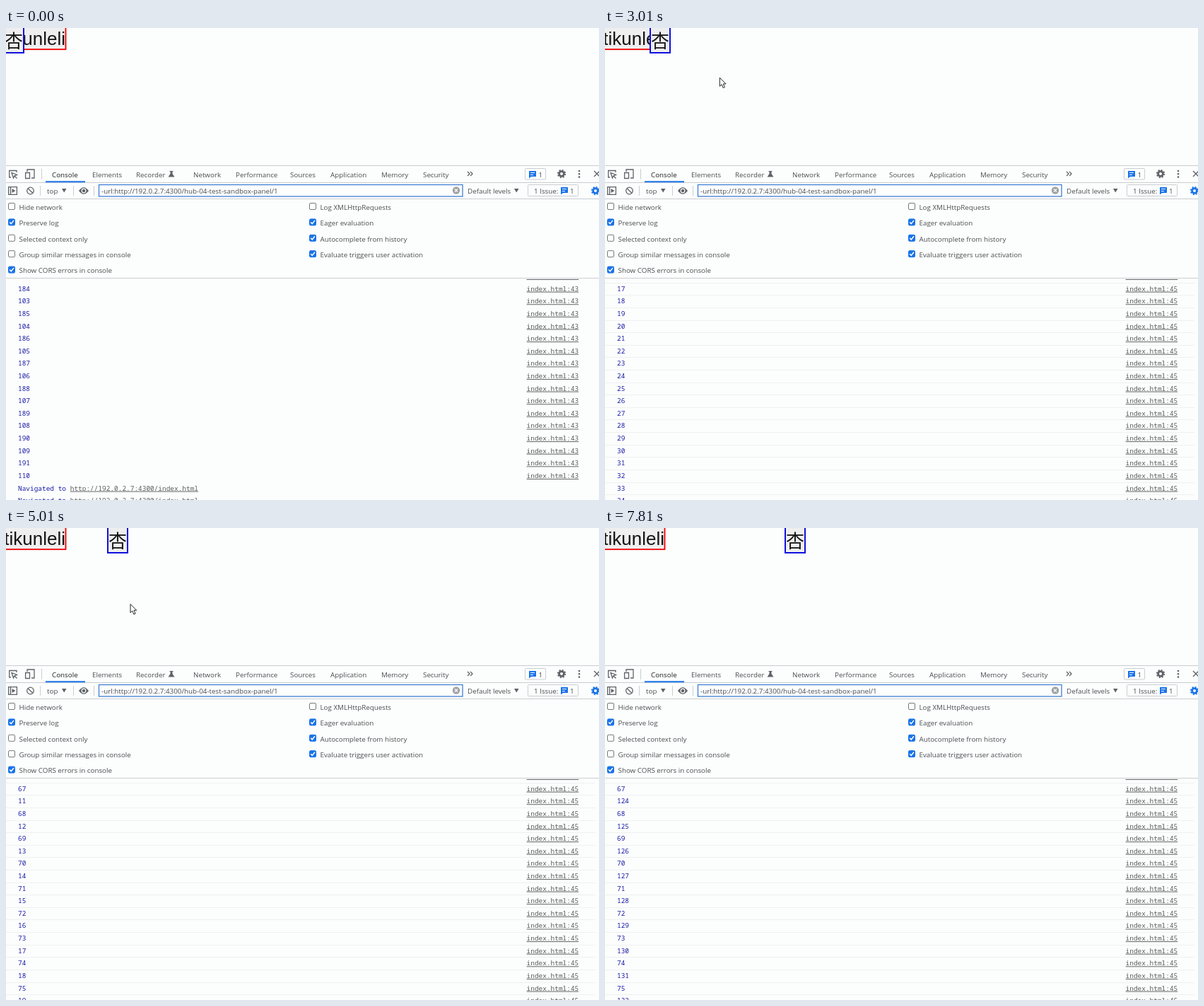
Write an HTML page that moves like this. It is 839 px wide and 667 px high and loops after 7.88 s.

```html
<!DOCTYPE html>
<html lang="en">
<head>
<meta charset="utf-8">
<style>
  html, body { margin: 0; width: 100%; height: 100%; overflow: hidden; background: #fcfefd; }
  svg { display: block; }
  text { white-space: pre; }
  .ui { font: 9.8px "Open Sans", "Noto Sans", sans-serif; fill: #4a4d51; }
  .log { font: 9.45px "Noto Sans Mono", monospace; fill: #1a1aa6; }
  .link { fill: #5c5c5c; text-decoration: underline; }
  .page { font: 26px "Liberation Sans", Arial, sans-serif; fill: #151515; }
  .han { font-family: "Noto Sans CJK SC", "Noto Sans CJK", sans-serif; }
  .rule { stroke: #cacdd1; fill: none; }
  .icon { stroke: #5f6368; stroke-width: 1.3; fill: none; }
  .solid { fill: #5f6368; }
</style>
</head>
<body>
<svg id="stage" width="839" height="667" viewBox="0 0 839 667">
  <defs>
    <clipPath id="pane"><rect y="354" width="839" height="313"/></clipPath>
    <g id="bubble">
      <path d="M0 0H10V8H3L0 10.500Z" fill="#1a73e8"/>
      <path d="M2 2.500H8M2 5.500H6" stroke="#fff"/>
    </g>
    <g id="gear" fill="none" stroke="currentColor">
      <circle r="3.400" stroke-width="2.800"/>
      <circle r="5.300" stroke-width="1.700" stroke-dasharray="2.100 2.062"/>
    </g>
  </defs>

  <rect x="-4" y="-4" width="88.500" height="34.200" fill="#efefef" stroke="#f00000" stroke-width="1.800"/>
  <text class="page" x="-2.700" y="23.500">tikunleli</text>
  <g id="box">
    <rect x="1" y="-3" width="28" height="38" fill="#eee" stroke="#1010e0" stroke-width="2"/>
    <text class="page han" x="2" y="28">杏</text>
  </g>

  <g id="console" clip-path="url(#pane)"></g>

  <path class="rule" d="M0 194.500H839M0 218.500H839M0 241.500H839M0 353.500H839M50.500 199V214M48.500 223V237M95.500 223V237M124.500 223V237"/>
  <path d="M56 217.300H112" stroke="#1a73e8" stroke-width="2"/>

  <!-- tab bar icons -->
  <path class="icon" d="M7 211H4.700V201.500H15V204M8 204.500L15.500 207.500L12 208.800L10.500 212ZM12 209L15.500 212.500"/>
  <path class="icon" d="M30 203V200H40V212H36M27.600 204.500H33.500V212.500H27.600Z"/>
  <path class="solid" d="M231.500 202H236.500V203H235.500V206L238.500 210.500H229.500L232.500 206V203H231.500Z"/>
  <path class="icon" d="M653 203L656 206L653 209M657 203L660 206L657 209"/>
  <rect class="rule" x="734.500" y="198.500" width="29" height="15.500" rx="1"/>
  <use href="#bubble" x="740" y="202"/>
  <use href="#gear" x="786" y="206" color="#5f6368"/>
  <g class="solid"><circle cx="811" cy="202" r="1.300"/><circle cx="811" cy="206.300" r="1.300"/><circle cx="811" cy="210.600" r="1.300"/></g>
  <path class="icon" d="M832 202L840 210M840 202L832 210"/>

  <!-- filter bar icons -->
  <path class="icon" d="M3.600 224.600H15.400V235.400H3.600ZM6.500 224.600V235.400"/>
  <path class="solid" d="M8.500 227L13.500 230L8.500 233ZM79 227H85.500L82.200 232.500ZM719 227H725.500L722.200 232.500Z"/>
  <circle class="icon" cx="34.500" cy="230" r="4.800"/><path class="icon" d="M31 226.500L38 233.500"/>
  <path class="solid" d="M103 230Q110 220.500 117 230Q110 239.500 103 230Z"/>
  <circle cx="110" cy="230" r="2.800" fill="#5f6368" stroke="#fcfefd" stroke-width="1.200"/>
  <rect x="131.500" y="221.500" width="514.500" height="16.500" fill="#fdfefe" stroke="#3f7fd4" stroke-width="1.300"/>
  <circle cx="637" cy="229.500" r="5.200" fill="#a0a3a6"/>
  <path d="M635 227.500L639 231.500M639 227.500L635 231.500" stroke="#fff" stroke-width="1.200"/>
  <rect class="rule" x="738.500" y="221.500" width="71" height="16" rx="1"/>
  <use href="#bubble" x="785" y="225"/>
  <use href="#gear" x="834" y="230" color="#1a73e8"/>

  <g id="labels"></g>
  <g id="cursor" stroke="#222" stroke-width="1" fill="#fff" stroke-linejoin="round">
    <path id="arrow" d="M.5 .5V12.700L3.300 10.100L5.400 15L7.600 14L5.500 9.300H9.200Z"/>
    <path id="hand" d="M4 .5Q5.700 0 5.800 2V6.500Q7.300 5.600 7.900 7Q9.300 6.200 9.800 7.600Q11.500 7 11.700 8.700V12Q11.500 13.500 10.600 14.500V17H4.800V15.500Q2.500 12.500 .7 10.300Q.2 8.700 2 9L3.800 10.700V2Z"/>
  </g>
</svg>
<script>
const LOOP = 7880, STEP = 77.4, ROW = 17.62;
const $ = id => document.getElementById(id);

function add(parent, tag, attrs, text = '') {
  const el = document.createElementNS('http://www.w3.org/2000/svg', tag);
  for (const key in attrs) el.setAttribute(key, attrs[key]);
  el.textContent = text;
  return parent.appendChild(el);
}
const label = (x, y, text, fill = '') => add($('labels'), 'text', { x, y, class: 'ui', style: fill && 'fill:' + fill }, text);

[['Console', 65], ['Elements', 122], ['Recorder', 184], ['Network', 265], ['Performance', 325], ['Sources', 402],
 ['Application', 459], ['Memory', 531], ['Security', 590], ['1', 753.5]]
  .forEach(([text, x]) => label(x, 210.5, text, text === 'Console' ? '#222' : ''));
[['top', 58], ['-url:http://192.0.2.7:4300/hub-04-test-sandbox-panel/1', 135], ['Default levels', 653],
 ['1 Issue:', 747], ['1', 798]].forEach(([text, x]) => label(x, 233.7, text));

function checkbox(x, y, text, on) {
  const g = add($('labels'), 'g', { transform: `translate(${x} ${y})` });
  add(g, 'rect', { x: -4.5, y: -4.5, width: 9, height: 9, rx: 1.5, fill: on ? '#1a73e8' : '#fff', stroke: on ? '#1a73e8' : '#777' });
  if (on) add(g, 'path', { d: 'M-2.8 0L-.8 2.2L3 -2.5', fill: 'none', stroke: '#fff', 'stroke-width': 1.5 });
  label(x + 10.5, y + 4.8, text);
}
[['Hide network', 0], ['Preserve log', 1], ['Selected context only', 0], ['Group similar messages in console', 0], ['Show CORS errors in console', 1]]
  .forEach(([text, on], i) => checkbox(8, 252 + i * 22.4, text, on));
[['Log XMLHttpRequests', 0], ['Eager evaluation', 1], ['Autocomplete from history', 1], ['Evaluate triggers user activation', 1]]
  .forEach(([text, on], i) => checkbox(434, 252 + i * 22.4, text, on));

// Rows are reused; only their text changes as the log scrolls.
const rows = Array.from({ length: 19 }, (_, j) => {
  const mid = 668.2 - j * ROW, y = mid + 3, parent = $('console');
  return {
    rule: add(parent, 'path', { d: `M0 ${Math.round(mid - 9) + .5}H834`, stroke: '#eff1f1' }),
    value: add(parent, 'text', { x: 17, y, class: 'log' }),
    address: add(parent, 'text', { x: 90.8, y, class: 'log link' }),
    source: add(parent, 'text', { x: 736.6, y, class: 'log link' })
  };
});

// Log entry r: 0 is the reload, positive entries follow it, negative ones precede it.
function entry(r) {
  if (r > 56) return r % 2 ? 57 + (r - 57) / 2 : (r - 56) / 2;
  if (r > 0) return r;
  if (r > -3) return null;
  const age = -r - 3;
  return age % 2 ? 191 - (age - 1) / 2 : 110 - age / 2;
}

function track(keys, n) {
  if (n <= keys[0][0]) return keys[0].slice(1);
  for (let i = keys.length - 1; i >= 0; i--) {
    const a = keys[i], b = keys[i + 1];
    if (n < a[0]) continue;
    if (!b) return a.slice(1);
    const u = (n - a[0]) / (b[0] - a[0]);
    return a.slice(1).map((v, k) => v + (b[k + 1] - v) * u);
  }
}

const firstTimer = [[15.06, 0], [26, 17], [48, 51], [63, 75], [75, 93], [86, 111], [99, 132]];
const secondTimer = [[50.75, 0], [63, 19], [75, 37], [86, 54], [99, 75]];
const pointer = [[0, 751, 652], [3, 580, 420], [6, 358, 256], [8, 212, 140], [10, 28, 23], [12, 5, -25], [17, 30, -20],
  [22, 120, 62], [26, 175.5, 81], [35, 175.5, 81], [44, 114, 30], [48, 110.5, 24], [52, 110.5, 24], [58, 175.5, 107],
  [67, 175.5, 107], [71, 632, 322], [75, 734, 468], [79, 760, 675]];

function draw(t) {
  const n = Math.min(99, Math.floor((t - 115) / STEP));
  const first = Math.floor(track(firstTimer, n)[0]);
  const second = Math.floor(track(secondTimer, n)[0]);
  const last = n < 13 ? -1 : first + second;

  rows.forEach((row, j) => {
    const r = last - j, value = entry(r), nav = value === null;
    row.value.textContent = nav ? 'Navigated to ' : value;
    row.address.textContent = nav ? 'http://192.0.2.7:4300/index.html' : '';
    row.source.textContent = nav ? '' : 'index.html:' + (r === 1 ? 39 : r > 1 ? 45 : 43);
    row.rule.style.opacity = n < 11 ? 0 : 1;
  });

  // Two timers write the same offset in turn, so the box flickers between them.
  const phase = (.56 * n) % 1;
  const shown = second && (phase < .22 || phase >= .72) ? second : first;
  $('box').setAttribute('transform', `translate(${Math.round(1.95 * shown - 3.51)} 0)`);

  const [x, y] = track(pointer, n);
  const overLink = x > 725 && x < 811 && y > 355;
  $('cursor').style.display = n < 0 || n > 78 ? 'none' : '';
  $('cursor').setAttribute('transform', `translate(${x} ${y})`);
  $('arrow').style.display = overLink ? 'none' : '';
  $('hand').style.display = overLink ? '' : 'none';
}

const start = performance.now();
function tick() {
  draw((performance.now() - start) % LOOP);
  requestAnimationFrame(tick);
}
tick();
</script>
</body>
</html>
```
